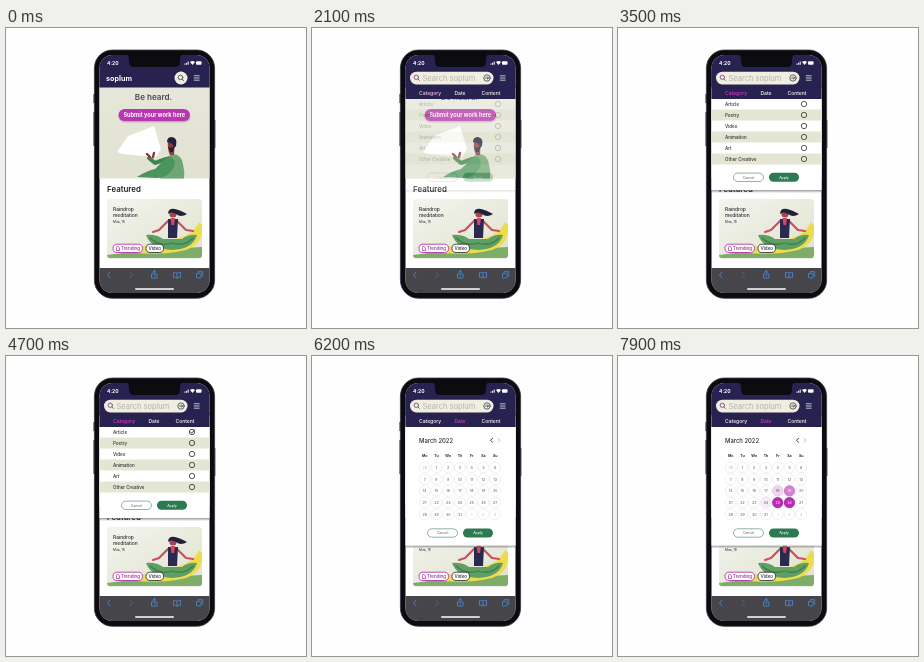
Animation, 300 px wide and 300 px high, one loop 8 s. Source, as an HTML page:

```html
<!DOCTYPE html>
<html lang="en">
<head>
<meta charset="utf-8">
<title>Phone search filters</title>
<style>
html, body { margin: 0; width: 100%; height: 100%; overflow: hidden; background: #fefefe; }
svg { display: block; width: 100vw; height: 100vh; }
text { font-family: Inter, "Open Sans", sans-serif; fill: #2b2b35; }
.mid { text-anchor: middle; }
.b { font-weight: 700; }
.m { font-weight: 500; }
.line { fill: none; stroke-linecap: round; stroke-linejoin: round; }
</style>
</head>
<body>
<svg viewBox="0 0 300 300">
  <defs>
    <clipPath id="screen"><rect x="93.500" y="27" width="110" height="238" rx="13"/></clipPath>
    <clipPath id="cardClip"><rect x="101" y="171" width="95" height="59" rx="3"/></clipPath>
    <clipPath id="heroClip"><rect x="93" y="59" width="112" height="91.500"/></clipPath>
    <linearGradient id="cardFill" x2="1" y2="1"><stop stop-color="#f4f4ee"/><stop offset="1" stop-color="#dfe2cd"/></linearGradient>
    <linearGradient id="heroFill" x2="0" y2="1"><stop stop-color="#e6e6da"/><stop offset="1" stop-color="#e1e2d1"/></linearGradient>
    <linearGradient id="shade" x2="0" y2="1"><stop stop-color="#444" stop-opacity=".55"/><stop offset="1" stop-color="#444" stop-opacity="0"/></linearGradient>
  </defs>

  <rect x="87.500" y="66" width="2" height="9" fill="#22222c"/>
  <rect x="87.500" y="84" width="2" height="34" fill="#22222c"/>
  <rect x="207.500" y="92" width="1.800" height="28" fill="#22222c"/>
  <rect x="88.400" y="22" width="120.200" height="248.300" rx="18" fill="#0b0b10" stroke="#3a3a44" stroke-width=".8"/>

  <g clip-path="url(#screen)">
    <rect x="93" y="27" width="112" height="238" fill="#fff"/>

    <g clip-path="url(#heroClip)">
      <rect x="93" y="59" width="112" height="92" fill="url(#heroFill)"/>
      <text class="mid" x="147.500" y="72.300" font-size="8.100" font-weight="600" style="fill:#4a4a50">Be heard.</text>
      <path d="M154 151Q154 135 165 126Q175 125 177 136Q179 144 178 151Z" fill="#6fa673"/>
      <path class="line" d="M143 130L149 135L160 131" stroke="#3f8552" stroke-width="4"/>
      <path d="M131 149Q140 143 149 141L162 128Q171 130 168 139Q163 149 152 150Z" fill="#4b945d"/>
      <path d="M111 124L122 108L148 98L155 121L150 129L116 126Z" fill="#fff"/>
      <path class="line" d="M141 126L144 129M148 125L147 129" stroke="#8d3a38" stroke-width="2.400"/>
      <path d="M162 112H169L168 127H164Q161 121 162 112Z" fill="#8d3a38"/>
      <path d="M161 114Q161 109 166 109Q172 110 170 118L168 120Q168 115 161 114Z" fill="#22213b"/>
      <path d="M162 119Q166 121 169 117L167 124H164Z" fill="#22213b"/>
    </g>
    <rect x="112.500" y="82.500" width="72" height="12" rx="6" fill="#777" opacity=".4"/>
    <rect x="112.500" y="81" width="71.500" height="12" rx="6" fill="#b935b1"/>
    <text class="mid b" x="148.300" y="88.900" font-size="5.600" style="fill:#fff">Submit your work here</text>

    <text x="101" y="163.500" font-size="7.900" font-weight="600" style="fill:#222228">Featured</text>
    <rect x="101" y="172" width="95" height="58.800" rx="3" fill="#ccc" opacity=".5"/>
    <g clip-path="url(#cardClip)">
      <rect x="101" y="171" width="96" height="60" fill="url(#cardFill)"/>
      <path d="M101 227Q140 222 197 219V231H101Z" fill="#7dad66"/>
      <path d="M104 219Q140 222 158 212Q185 212 193 194L196 197Q198 216 180 222Q140 231 104 219Z" fill="#ecdc4e"/>
      <path d="M140 207Q150 206 157 211H176Q183 206 191 207Q187 221 166 222Q145 221 140 207Z" fill="#5f9f63"/>
      <path class="line" d="M144 210Q154 219 166 215Q179 219 187 210" stroke="#39804c" stroke-width="1.300"/>
      <path class="line" d="M162 193L153 202L147 204M171 193L180 202L187 203" stroke="#cf4c63" stroke-width="2.200"/>
      <path d="M162 191H172L171 210H162Z" fill="#2a2950"/>
      <path d="M164.500 190H169L168 197H165.500Z" fill="#cf4c63"/>
      <circle cx="167" cy="186" r="3.600" fill="#a84452"/>
      <path d="M162 186Q162 180 169 181Q174 182 181 186Q175 190 170 186Q165 183 162 186Z" fill="#22213b"/>
    </g>
    <text class="m" font-size="4.900"><tspan x="107" y="182.500">Raindrop</tspan><tspan x="107" y="188.800">meditation</tspan></text>
    <text x="107" y="194.600" font-size="3.200">Mira, 18</text>
    <rect x="107" y="216.200" width="29.500" height="8.300" rx="4.100" fill="#fff" stroke="#b935b1" stroke-width=".9"/>
    <path d="M110.500 222.500V219.500L111.500 218L113.500 220V222.500Z" fill="none" stroke="#b935b1" stroke-width=".8"/>
    <text class="m" x="115" y="222.100" font-size="4.500" style="fill:#8d268c">Trending</text>
    <rect x="140" y="216.200" width="17.500" height="8.300" rx="4.100" fill="#fff" stroke="#222" stroke-width=".8"/>
    <text class="mid m" x="148.800" y="222.100" font-size="4.600">Video</text>

    <g id="catPanel"></g>
    <g id="calPanel"></g>

    <g id="tabs">
      <rect x="93" y="57" width="112" height="14" fill="#27224f"/>
      <g class="m" font-size="5">
        <text id="tabCat" x="107" y="67.400">Category</text>
        <text id="tabDate" x="142.500" y="67.400">Date</text>
        <text x="169.500" y="67.400" style="fill:#fff">Content</text>
      </g>
    </g>

    <rect x="93" y="27" width="112" height="32.500" fill="#27224f"/>
    <path d="M119 26H177Q174 27 174 31V34Q174 39 169 39H128Q123 39 123 34V31Q123 27 119 26Z" fill="#0b0b10"/>
    <text class="b" x="101" y="36.700" font-size="5" style="fill:#fff">4:20</text>
    <g fill="#fff">
      <path d="M178.500 36.800V35.500H179.500V36.800ZM180.100 36.800V34.700H181.100V36.800ZM181.700 36.800V33.600H182.700V36.800Z"/>
      <path d="M184 34Q186.500 32 189 34L186.500 37Z"/>
      <rect x="190" y="33.200" width="5.500" height="3.600" rx="1"/>
    </g>
    <g id="closed">
      <text class="b" x="100" y="52.600" font-size="7.200" style="fill:#fff">soplum</text>
      <circle cx="175" cy="50" r="6.500" fill="#efeee1"/>
      <g class="line" stroke="#55505c" stroke-width=".9"><circle cx="174.500" cy="49.400" r="2.300"/><path d="M176.300 51.200L177.800 52.800"/></g>
    </g>
    <g id="opened">
      <rect x="93" y="42" width="90" height="16" fill="#27224f"/>
      <rect x="98" y="43.700" width="83.500" height="12.700" rx="6.300" fill="#efeee1"/>
      <g class="line" stroke="#8a4a88" stroke-width=".9"><circle cx="104.300" cy="49.300" r="2.200"/><path d="M106 51L107.500 52.500"/></g>
      <text x="110.500" y="52.800" font-size="7.500" style="fill:#b4b3a8">Search soplum</text>
      <g class="line" stroke="#45414f" stroke-width=".8"><circle cx="175" cy="50" r="3.200"/><path d="M173.500 50H176.500M175.300 48.800L176.500 50L175.300 51.200"/></g>
    </g>
    <path class="line" d="M188.200 47.800H193.200M188.200 50H193.200M188.200 52.200H193.200" stroke="#e8e8f0" stroke-width=".8"/>

    <rect x="93" y="240" width="112" height="26" fill="#45454a"/>
    <g class="line" stroke="#4a86cf" stroke-width=".9">
      <path d="M104 244L101.500 247L104 250"/>
      <path d="M124 244L126.500 247L124 250" opacity=".55"/>
      <path d="M146.800 246H145.500V250H151V246H149.700M148.250 248V242.700M146.700 244.200L148.250 242.700L149.800 244.200"/>
      <path d="M171 245.200Q169.500 244 167.500 244.300V249.300Q169.500 249 171 250Q172.500 249 174.500 249.300V244.300Q172.500 244 171 245.200V250"/>
      <rect x="190.500" y="245.300" width="4.600" height="4.600" rx=".8"/><path d="M192.300 243.700H196.700V248.200"/>
    </g>
    <rect x="129" y="260.200" width="39" height="1.600" rx=".8" fill="#fff"/>
  </g>
</svg>
<script>
const LOOP = 8000, STEP = 100;
const $ = id => document.getElementById(id);

const shell = h => `<rect x="93" y="${71 + h}" width="112" height="3" fill="url(#shade)"/>
  <rect x="93" y="71" width="112" height="${h}" fill="#fff"/>`;

const buttons = y => `<rect x="115.500" y="${y - 4.2}" width="30" height="8.400" rx="4.200" fill="#fff" stroke="#5f957a" stroke-width=".7"/>
  <text class="mid" x="130.500" y="${y + 1.2}" font-size="3.500" style="fill:#666">Cancel</text>
  <rect x="151" y="${y - 4.5}" width="30" height="9" rx="4.500" fill="#2c7a51"/>
  <text class="mid m" x="166" y="${y + 1.2}" font-size="3.500" style="fill:#fff">Apply</text>`;

const options = ["Article", "Poetry", "Video", "Animation", "Art", "Other Creative"];
$("catPanel").innerHTML = shell(91) + options.map((name, i) => {
  const y = 76 + 11 * i;
  return `${i % 2 ? `<rect x="93" y="${y - 5.5}" width="112" height="11" fill="#e5e5d4"/>` : ""}
    <text class="m" x="107" y="${y + 1.6}" font-size="4.500">${name}</text>
    <circle cx="186" cy="${y}" r="2.700" fill="none" stroke="#333" stroke-width=".8"/>
    <path id="tick${i}" class="line" d="M184.600 ${y}l1.100 1.200l2.800 -3.300" stroke="#222" stroke-width=".9"/>`;
}).join("") + buttons(149.3);

// Calendar cells: index 0 is Monday 28 February
const cellX = i => 112.7 + 11.75 * (i % 7);
const cellY = i => 111.5 + 11.7 * Math.floor(i / 7);
const weekdays = ["Mo", "Tu", "We", "Th", "Fr", "Sa", "Su"];
let cal = shell(118.5) + `<text class="m" x="107" y="86.600" font-size="5.900">March 2022</text>
  <path class="line" d="M180.500 82.300L178.500 84.300L180.500 86.300" stroke="#222" stroke-width=".9"/>
  <path class="line" d="M186 82.300L188 84.300L186 86.300" stroke="#aaa" stroke-width=".8"/>`;
weekdays.forEach((d, i) => cal += `<text class="mid b" x="${cellX(i)}" y="101.300" font-size="3.600">${d}</text>`);
for (let i = 0; i < 35; i++) {
  const day = i === 0 ? 28 : i > 31 ? i - 31 : i;
  const other = i === 0 || i > 31;
  const x = cellX(i), y = cellY(i);
  cal += `<circle cx="${x}" cy="${y}" r="5.400" fill="#fff" stroke="#e6e6e8" stroke-width=".6"/>
    <circle id="hit${i}" cx="${x}" cy="${y}" r="5.600" fill="#b52fb0" opacity="0"/>
    <text id="day${i}" class="mid" x="${x}" y="${y + 1.3}" font-size="3.600" style="fill:${other ? "#b5b5b8" : "#55555a"}">${day}</text>`;
}
$("calPanel").innerHTML = cal + buttons(177);

// The pointer winds through the days: [day, time]
const trail = [[1, 6500], [2, 6600], [3, 6700], [4, 6800], [5, 6890], [12, 6960], [11, 7030], [10, 7110],
  [8, 7200], [15, 7300], [16, 7400], [17, 7500], [18, 7600], [19, 7700], [26, 7800], [25, 7900], [24, 8000]];

const clamp = v => Math.max(0, Math.min(1, v));
const fade = (t, a, b) => clamp((t - a + STEP) / (b - a + STEP));
const mix = (a, b, p) => a + (b - a) * p;
const tint = p => `rgb(${mix(255, 211, p)},${mix(255, 58, p)},${mix(255, 200, p)})`;

function glow(age) {
  if (age < 0) return clamp((age + 110) / 110);
  return age < 100 ? 1 : clamp(1 - (age - 100) / 250);
}

function draw(time) {
  const t = Math.floor(time / STEP) * STEP;
  const open = fade(t, 700, 1300);
  const cat = fade(t, 2100, 2400);
  const date = fade(t, 5600, 6200);

  $("opened").style.opacity = open;
  $("tabs").style.opacity = open;
  $("catPanel").style.opacity = cat;
  $("calPanel").style.opacity = date;
  $("tabCat").style.fill = tint(cat * (1 - date));
  $("tabDate").style.fill = tint(date);

  options.forEach((name, i) => $("tick" + i).style.opacity = 0);
  $("tick0").style.opacity = fade(t, 3800, 4000);
  $("tick1").style.opacity = fade(t, 4700, 5200);

  for (const [day, at] of trail) {
    const g = glow(t - at);
    $("hit" + day).style.opacity = g;
    $("day" + day).style.fill = g > .4 ? "#fff" : "#55555a";
  }
}

const start = performance.now();
function frame() {
  draw((performance.now() - start) % LOOP);
  requestAnimationFrame(frame);
}
draw(0);
requestAnimationFrame(frame);
</script>
</body>
</html>
```
